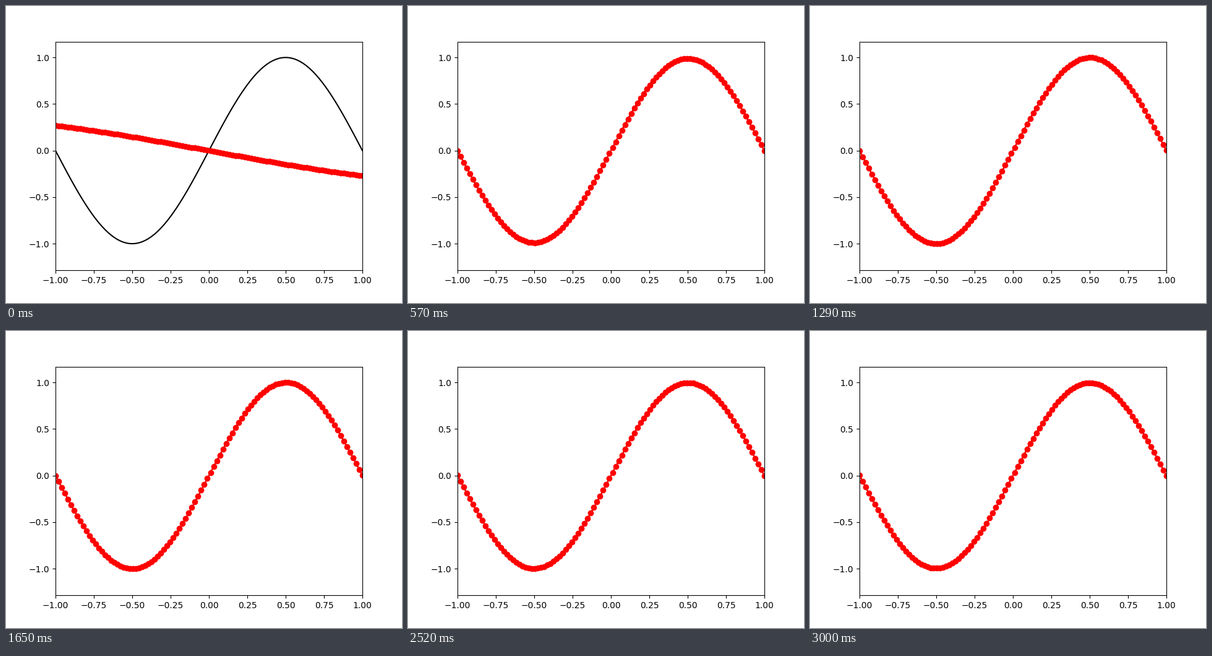
Animation of 640x480 px, one loop 3.03 s. Source, as a matplotlib script:

```python
import matplotlib.pyplot as plt
import numpy as np
from matplotlib.animation import FuncAnimation

FRAMES = 101
INTERVAL = 30

x = np.linspace(-1, 1, 100)
target = np.sin(np.pi * x)
start = -0.485 * np.tanh(0.63 * x)


def fit(n):
    """Model curve at step n: a damped swing onto the target, then a small wobble."""
    swing = np.exp(-n / 2.2) * np.cos(np.pi * n / 2)
    ramp = min(n / 30, 1) ** 2
    tilt = 0.003 * ramp * np.cos(np.pi * (n - 30) / 70)
    gain = 0.003 * ramp * np.cos(np.pi * (n - 30) / 10)
    gain += 0.022 * np.exp(-((n - 22) / 6) ** 2) * np.sin(np.pi * n / 5)
    return target + swing * (start - target) + tilt * x + gain * target


fig, ax = plt.subplots(figsize=(6.4, 4.8), dpi=100)
ax.plot(x, target, color="black")
dots, = ax.plot(x, start, "ro-")
ax.set_xlim(-1, 1)
ax.set_ylim(-1.286, 1.17)


def update(n):
    dots.set_ydata(fit(n))
    return dots,


anim = FuncAnimation(fig, update, frames=FRAMES, interval=INTERVAL,
                     repeat=True, repeat_delay=0)
plt.show()
```
